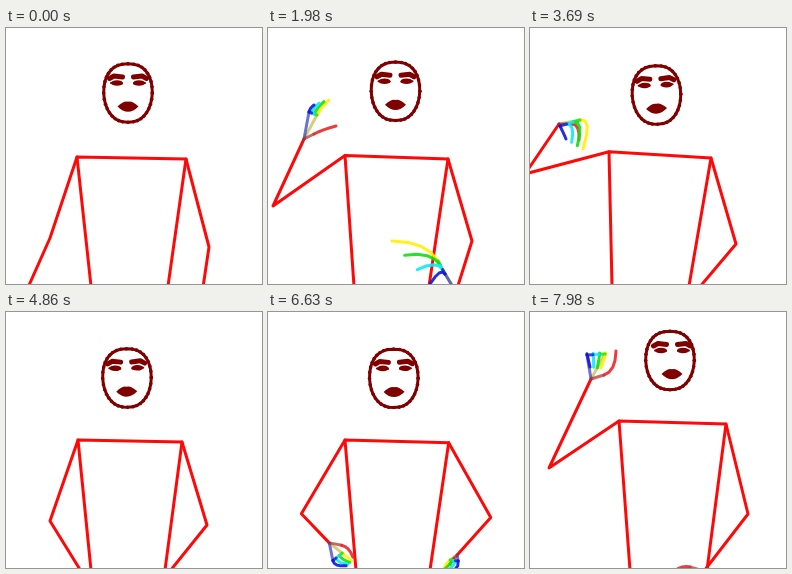
Recreate the animation shown at these times as an HTML page with a canvas. Size 256 px wide and 256 px high, loop 8000 ms.

```html
<!DOCTYPE html>
<html lang="en">
<head>
<meta charset="utf-8">
<title>Signing figure</title>
<style>
  html, body { margin: 0; width: 100%; height: 100%; overflow: hidden; background: #fff; }
  canvas { display: block; width: 100vw; height: 100vh; }
</style>
</head>
<body>
<canvas id="stage" width="256" height="256"></canvas>
<script>
const ctx = document.getElementById('stage').getContext('2d');
const LOOP = 8000;
const BODY = '#ff0808', FACE = '#800000', BONE = 3;
const FINGERS = ['#fff000', '#10e010', '#10e8f8', '#1018d8'];

// Hands: thumb, index and little finger as knuckle and tip, relative to the wrist.
const down = [4, 8, 8, 16, 4, 14, 6, 26, -6, 14, -6, 24];
const open = [10, -5, 32, -13, 13, -24, 25, -39, 5, -27, 10, -34];
const high = [10, -10, 22, -22, 8, -26, 12, -46, -6, -24, -8, -42];
const droop = [13, 0, 20, 16, 21, -4, 24, 25, 1, 2, 7, 15];
const low = [13, 3, 23, 19, 12, 13, 22, 22, 3, 23, 15, 27];
const across = [11, 1, 25, 4, 15, 4, 23, 9, 5, 6, 21, 14];
const curled = [13, -4, 25, -28, 14, -25, 10, -11, -4, -24, -1, -12];
const reach = [-8, 4, -18, 6, -18, -31, -64, -51, -11, -18, -26, -8];
const inward = [-3, 3, -7, 9, -7, 5, -13, 13, 1, 6, -16, 21];
const under = [-14, -4, -30, 0, -20, 14, -35, 18, -8, 18, -25, 24];

// head: centre x, y, sideways turn, tilt; shoulders: x, y twice; hips: x at the lower edge;
// arms: elbow x, y, wrist x, y.
const rest = {
  head: [122, 65, 0, 0], shoulders: [71, 129, 180, 131], hips: [85, 162],
  left: [44, 210, 20, 264], right: [203, 219, 196, 266], leftHand: down, rightHand: down
};
const wave = {
  head: [127.5, 63.3, 0, 0], shoulders: [77, 127.5, 180, 131], hips: [86, 161],
  left: [5, 178, 36, 111], right: [204, 213, 188, 264], leftHand: open, rightHand: reach
};
const bent = {
  head: [126.5, 67, -0.5, -0.04], shoulders: [79, 123.7, 181, 130], hips: [82, 159],
  left: [-5, 146, 29, 96], right: [206, 216, 168, 261], leftHand: droop, rightHand: down
};
const lowered = {
  head: [121, 66, -0.5, -0.02], shoulders: [72, 128, 176, 130], hips: [85, 159],
  left: [44, 209, 78, 264], right: [201, 213, 160, 264], leftHand: down, rightHand: down
};
const lifting = {
  head: [125.5, 66.5, 0.5, 0], shoulders: [77, 128, 181, 131], hips: [88, 162],
  left: [34, 202, 60, 235], right: [204, 213, 175, 264], leftHand: low, rightHand: down
};
const folded = {
  head: [126.5, 66, -0.5, -0.02], shoulders: [77, 128.3, 180, 130], hips: [88, 162],
  left: [39, 201, 67, 216], right: [205, 210, 194, 228], leftHand: across, rightHand: inward
};
const leaning = {
  head: [140, 48.5, 2, 0], shoulders: [89, 109, 196, 112], hips: [100, 177],
  left: [19, 156, 61, 67], right: [218, 202, 174, 259], leftHand: curled, rightHand: under
};

const keys = [
  [0, rest],
  [60, rest],
  [480, { ...wave, left: [8, 130, 45, 48], leftHand: high, right: [205, 216, 192, 266], rightHand: down }],
  [900, { ...wave, right: [205, 214, 190, 266], rightHand: down }],
  [1600, wave],
  [1980, wave],
  [2300, { ...wave, left: [2, 172, 34, 106], right: [205, 214, 186, 266], rightHand: down }],
  [2900, { ...wave, left: [10, 176, 38, 110], right: [206, 215, 178, 264], rightHand: down }],
  [3500, bent],
  [4050, bent],
  [4700, lowered],
  [4860, lowered],
  [5350, { ...lifting, left: [4, 176, 36, 112], leftHand: open }],
  [5700, { ...lifting, left: [5, 178, 38, 116], leftHand: open }],
  [6060, lifting],
  [6500, { ...lifting, right: [219, 208, 186, 250], rightHand: inward }],
  [6850, { ...folded, left: [32, 201, 64, 222], right: [231, 200, 196, 228] }],
  [7230, folded],
  [7350, folded],
  [7680, { ...leaning, head: [134, 56, 1, 0], shoulders: [84, 117, 189, 120], left: [4, 164, 46, 100] }],
  [7980, leaning]
];

const mix = (a, b, u) => a.map((v, i) => v + (b[i] - v) * u);

function poseAt(time) {
  const next = keys.findIndex(key => key[0] > time);
  if (next < 0) return keys[keys.length - 1][1];
  const [t0, from] = keys[next - 1], [t1, to] = keys[next];
  const u = (time - t0) / (t1 - t0), eased = u * u * (3 - 2 * u);
  const pose = {};
  for (const part in from) pose[part] = mix(from[part], to[part], eased);
  return pose;
}

function line(points, color, width, alpha = 1) {
  ctx.globalAlpha = alpha;
  ctx.strokeStyle = color;
  ctx.lineWidth = width;
  ctx.beginPath();
  points.forEach(([x, y]) => ctx.lineTo(x, y));
  ctx.stroke();
  ctx.globalAlpha = 1;
}

function ellipse(x, y, rx, ry) {
  ctx.beginPath();
  ctx.ellipse(x, y, rx, ry, 0, 0, 2 * Math.PI);
  ctx.fill();
}

function drawHead([x, y, turn, tilt]) {
  ctx.save();
  ctx.translate(x, y);
  ctx.rotate(tilt);
  ctx.fillStyle = FACE;
  const power = (v, p) => Math.sign(v) * Math.abs(v) ** p;
  const outline = Array.from({ length: 37 }, (_, i) => {
    const a = i * Math.PI / 18, jaw = 1 - 0.08 * Math.max(0, Math.sin(a));
    return [24.3 * jaw * power(Math.cos(a), 0.82), 29.2 * power(Math.sin(a), 0.88)];
  });
  line(outline, FACE, 3);
  outline.forEach(([px, py]) => ellipse(px, py, 1.8, 1.8));

  ctx.translate(turn, 0);
  for (const side of [-1, 1]) {
    line([[18.5 * side, -14.5], [14 * side, -17], [5.5 * side, -16]], FACE, 5);
    ellipse(11 * side, -10, 6, 2.8);
    line([[6 * side, -9.5], [17 * side, -10]], FACE, 2);
  }
  ctx.beginPath();
  ctx.moveTo(-10.5, 13.5);
  ctx.quadraticCurveTo(-4, 7.5, 0, 8.8);
  ctx.quadraticCurveTo(4, 7.5, 10.5, 13.5);
  ctx.quadraticCurveTo(0, 24, -10.5, 13.5);
  ctx.fill();
  ctx.restore();
}

// A finger leaves its knuckle along the palm and bends towards the tip.
function drawFinger(wrist, knuckle, tip, color) {
  const palm = Math.hypot(knuckle[0] - wrist[0], knuckle[1] - wrist[1]) || 1;
  const length = Math.hypot(tip[0] - knuckle[0], tip[1] - knuckle[1]);
  const bend = mix(wrist, knuckle, 1 + 0.45 * length / palm);
  const points = [0, 0.25, 0.5, 0.75, 1].map(u => mix(mix(knuckle, bend, u), mix(bend, tip, u), u));
  line(points, color, BONE, 0.9);
}

function drawHand([x, y], hand) {
  const [thumb, thumbTip, index, indexTip, little, littleTip] =
    [0, 2, 4, 6, 8, 10].map(i => [x + hand[i], y + hand[i + 1]]);
  const wrist = [x, y];
  line([wrist, index], '#b8b020', BONE, 0.6);
  line([wrist, little], '#3038c0', BONE, 0.7);
  line([wrist, thumb], '#b02828', BONE, 0.7);
  drawFinger(wrist, thumb, thumbTip, '#e82828');
  FINGERS.forEach((color, i) => {
    const knuckle = mix(index, little, i / 3);
    if (i) line([mix(index, little, (i - 1) / 3), knuckle], color, BONE, 0.8);
    drawFinger(wrist, knuckle, mix(indexTip, littleTip, i / 3), color);
  });
}

function draw(time) {
  const { head, shoulders, hips, left, right, leftHand, rightHand } = poseAt(time);
  const point = (list, i) => [list[i], list[i + 1]];
  const leftShoulder = point(shoulders, 0), rightShoulder = point(shoulders, 2);
  ctx.fillStyle = '#fff';
  ctx.fillRect(0, 0, 256, 256);
  line([[hips[0], 258], leftShoulder, rightShoulder, [hips[1], 258]], BODY, BONE);
  line([leftShoulder, point(left, 0), point(left, 2)], BODY, BONE);
  line([rightShoulder, point(right, 0), point(right, 2)], BODY, BONE);
  drawHand(point(left, 2), leftHand);
  drawHand(point(right, 2), rightHand);
  drawHead(head);
}

ctx.lineCap = ctx.lineJoin = 'round';
function frame() {
  draw(performance.now() % LOOP);
  requestAnimationFrame(frame);
}
frame();
</script>
</body>
</html>
```
